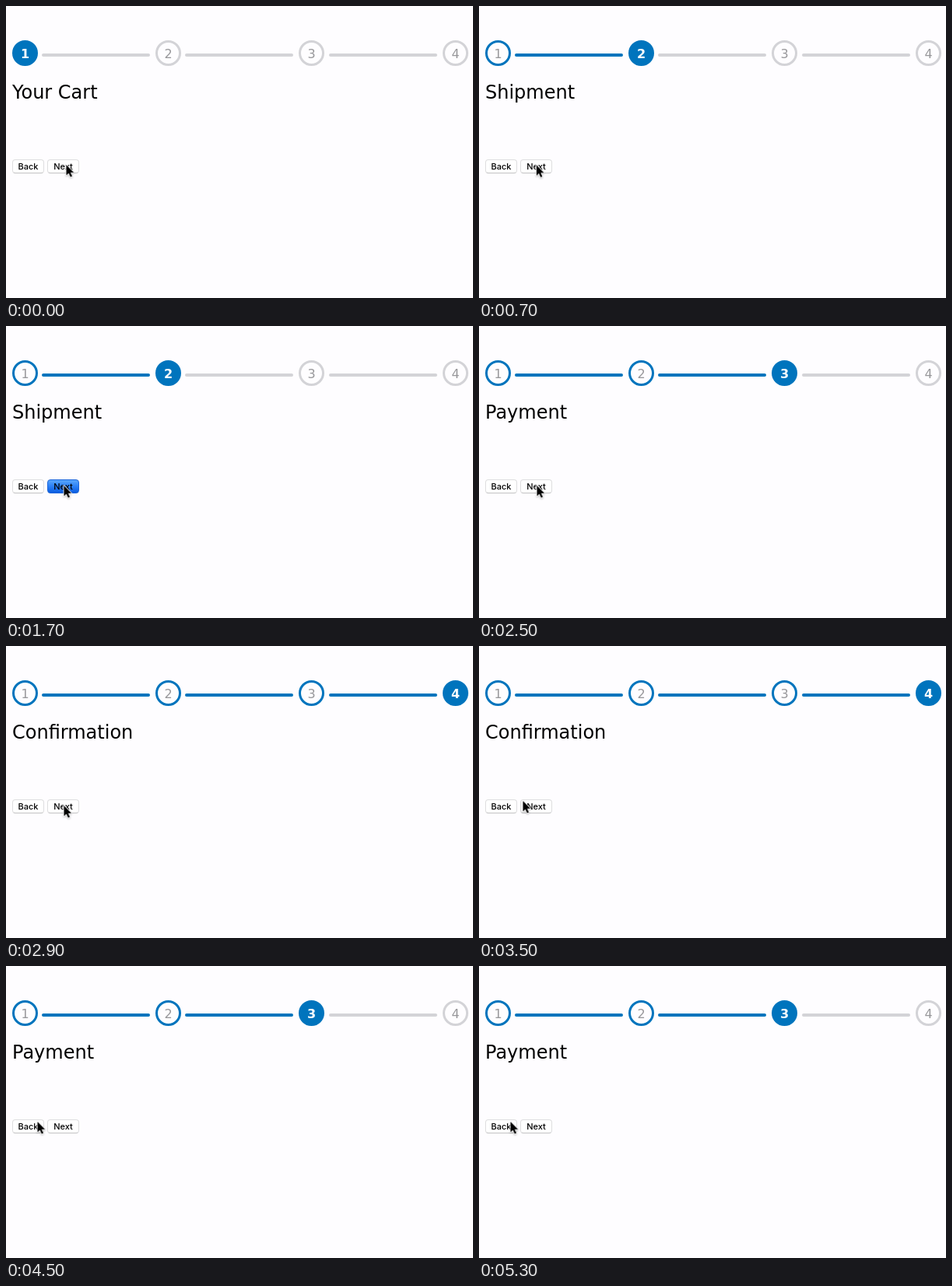
Recreate the animation shown at these times as an HTML page. Size 600 px wide and 375 px high, loop 5600 ms.

```html
<!DOCTYPE html>
<html lang="en">
<head>
<meta charset="utf-8">
<title>Checkout stepper</title>
<style>
  :root { --blue: #0074bd; --grey: #d3d3d7; --paper: #fefdff; --digit: #98989b; }
  html, body { margin: 0; width: 100%; height: 100%; overflow: hidden; background: var(--paper); }
  .stage { position: relative; width: 600px; height: 375px; overflow: hidden; }
  .stage > * { position: absolute; box-sizing: border-box; }
  .step, .bar, h1, .press, .cursor { animation: 5600ms step-end infinite; }

  .step {
    top: 44px; width: 33px; height: 33px; border: 3px solid var(--grey); border-radius: 50%;
    font: 16px/29px "DejaVu Sans", sans-serif; text-align: center; color: var(--digit);
  }
  .bar { top: 61px; width: 139px; height: 4px; border-radius: 2px; background: var(--grey); }
  h1 {
    left: 8px; top: 96px; margin: 0; opacity: 0; color: #000; white-space: nowrap;
    font: 400 24px/30px "DejaVu Sans", sans-serif;
  }

  .button {
    top: 197px; height: 18px; border: 1px solid #dededf; border-bottom-color: #c2c2c4;
    border-radius: 4px; background: #fff; text-align: center; color: #000;
    font: 500 11px/17px Inter, sans-serif;
  }
  .press {
    position: absolute; inset: -1px; border-radius: 4px; opacity: 0;
    background: linear-gradient(#58a6fb, #2b80f6 50%, #0a5ce0); border: 1px solid #1c66dc;
    box-sizing: border-box;
  }
  .button span { position: relative; }
  .cursor { left: 0; top: 0; overflow: visible; filter: drop-shadow(0 1px 1px rgba(0, 0, 0, .25)); }

  /* Steps */
  @keyframes step1 {
    from { background: var(--blue); border-color: var(--blue); color: #fff; font-weight: 700; }
    12.5%, to { background: var(--paper); border-color: var(--blue); color: var(--digit); font-weight: 400; }
  }
  @keyframes step2 {
    12.5% { background: var(--blue); border-color: var(--blue); color: #fff; font-weight: 700; }
    32.142%, to { background: var(--paper); border-color: var(--blue); color: var(--digit); font-weight: 400; }
  }
  @keyframes step3 {
    32.142%, 75%, to { background: var(--blue); border-color: var(--blue); color: #fff; font-weight: 700; }
    50% { background: var(--paper); border-color: var(--blue); color: var(--digit); font-weight: 400; }
  }
  @keyframes step4 {
    50% { background: var(--blue); border-color: var(--blue); color: #fff; font-weight: 700; }
    75%, to { background: var(--paper); border-color: var(--grey); color: var(--digit); font-weight: 400; }
  }

  /* Bars */
  @keyframes bar1 { 12.5%, to { background: var(--blue); } }
  @keyframes bar2 { 32.142%, to { background: var(--blue); } }
  @keyframes bar3 { 50% { background: var(--blue); } 75%, to { background: var(--grey); } }

  /* Headings */
  @keyframes cart { from { opacity: 1; } 12.5%, to { opacity: 0; } }
  @keyframes shipment { 12.5% { opacity: 1; } 32.142%, to { opacity: 0; } }
  @keyframes payment { 32.142%, 75%, to { opacity: 1; } 50% { opacity: 0; } }
  @keyframes confirmation { 50% { opacity: 1; } 75%, to { opacity: 0; } }

  /* Clicks */
  @keyframes next {
    10.714%, 30.357%, 48.214% { opacity: 1; }
    12.5%, 32.142%, 50%, to { opacity: 0; }
  }
  @keyframes back { 71.428% { opacity: 1; } 75%, to { opacity: 0; } }

  /* Pointer, moving in 100 ms jumps */
  @keyframes pointer {
    from { transform: translate(77.5px, 204px); }
    10.714% { transform: translate(77.5px, 204px); animation-timing-function: steps(3); }
    16.071% { transform: translate(66.5px, 205px); }
    19.642% { transform: translate(66.5px, 205px); animation-timing-function: steps(5); }
    28.571% { transform: translate(74.5px, 205px); }
    57.142% { transform: translate(74.5px, 205px); animation-timing-function: steps(3); }
    62.5% { transform: translate(56.5px, 199px); animation-timing-function: steps(3); }
    67.857%, to { transform: translate(40.5px, 200px); }
  }
</style>
</head>
<body>
<div class="stage">
  <div class="step" style="left:8px; animation-name:step1">1</div>
  <div class="bar" style="left:46px; animation-name:bar1"></div>
  <div class="step" style="left:192px; animation-name:step2">2</div>
  <div class="bar" style="left:230px; animation-name:bar2"></div>
  <div class="step" style="left:376px; animation-name:step3">3</div>
  <div class="bar" style="left:415px; animation-name:bar3"></div>
  <div class="step" style="left:561px; animation-name:step4">4</div>

  <h1 style="animation-name:cart">Your Cart</h1>
  <h1 style="animation-name:shipment">Shipment</h1>
  <h1 style="animation-name:payment">Payment</h1>
  <h1 style="animation-name:confirmation">Confirmation</h1>

  <div class="button" style="left:8px; width:41px"><i class="press" style="animation-name:back"></i><span>Back</span></div>
  <div class="button" style="left:53px; width:41px"><i class="press" style="animation-name:next"></i><span>Next</span></div>

  <svg class="cursor" style="animation-name:pointer" width="12" height="18">
    <path d="M0 0V13.4L3 10.6L5.3 15.6L7.5 14.7L5.4 9.8H9.6Z"
      stroke="#fff" stroke-width="1.6" stroke-linejoin="round" paint-order="stroke"/>
  </svg>
</div>
</body>
</html>
```
